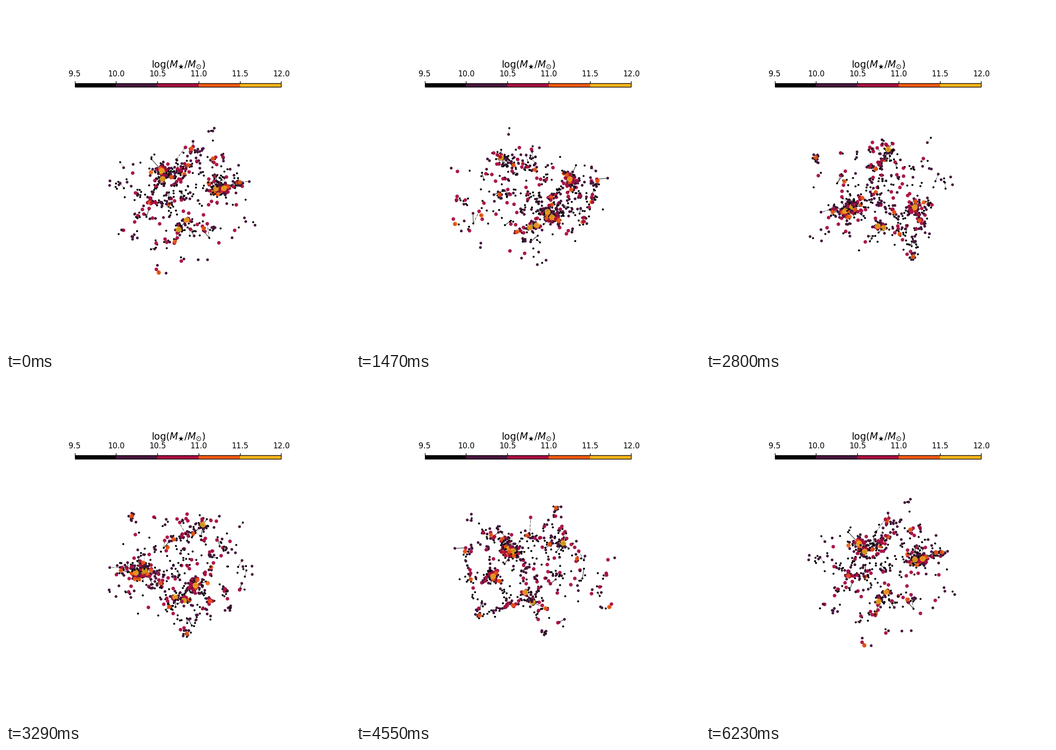
A matplotlib script that plays this animation: 748x748 px, repeating every 6.3 s.

```python
import numpy as np
import matplotlib.pyplot as plt
from matplotlib.animation import FuncAnimation
from matplotlib.collections import LineCollection
from matplotlib.colors import BoundaryNorm, ListedColormap, to_rgba

SIZE, FRAMES, STEP = 748, 90, 70
CENTER = np.array([381.0, 414.0])
DIST = 2570.0                       # camera distance in pixels
ELEV = np.radians(30)
BOX = np.array([140, 140, 100])     # half sizes of the survey volume
BOX_TURN = -30                      # the volume's own angle at the start

COLORS = ["#000000", "#47163d", "#a80d40", "#f0590f", "#f8b51a"]
DIAMETER = np.array([4.4, 6.0, 7.8, 9.4, 12.6])
ALPHA = [1, 1, 0.95, 0.88, 0.8]
ORANGE, YELLOW = 3, 4

# Key points are (right, front, up) in pixels around the volume's centre.
HALOS = [((-43, -90, 14), 10, 55), ((-39, 62, 78), 8, 20),
         ((12, -11, -67), 6, 10), ((-6, 2, -83), 7, 12),
         ((94, -34, 1), 9, 42), ((76, -27, 4), 12, 50)]

BIG = [(23, -141, 43), (70, -77, 52), (15, -6, 74), (-21, 36, 68),
       (7, -132, -18), (122, 78, 79), (125, -44, 10), (-70, -52, -46),
       (-29, -119, -90), (-14, 30, -97), (47, 112, -13), (-47, 166, -88)]

rng = np.random.default_rng(12)
points, kinds, links = [], [], []


def turn(p, deg):
    """Rotate points about the vertical axis."""
    c, s = np.cos(np.radians(deg)), np.sin(np.radians(deg))
    x, f, z = np.asarray(p, float).T
    return np.column_stack([x * c - f * s, x * s + f * c, z])


def add(p, kind):
    points.extend(p)
    kinds.extend(np.broadcast_to(kind, len(p)))


def add_small(p):
    add(p, rng.choice(3, len(p), p=(0.5, 0.32, 0.18)))


def scatter_around(center, spread, n):
    return np.asarray(center) + rng.normal(0, spread, (n, 3))


def add_halo(center, spread, n):
    p = scatter_around(center, spread, n)
    add_small(p)
    links.extend((center, q) for q in p if rng.random() < 0.75)
    if n > 40:
        add(scatter_around(center, spread, 3), ORANGE)


def add_group(center, spread, n):
    p = scatter_around(center, spread, n)
    add_small(p)
    links.extend((a, b) for a, b in zip(p, p[1:]) if rng.random() < 0.2)


def add_filaments(nodes, reach=105):
    """String small galaxies from each node to its nearest neighbours."""
    for a in nodes:
        gaps = np.linalg.norm(nodes - a, axis=1)
        for k in np.argsort(gaps)[1:3]:
            if gaps[k] < reach:
                n = int(gaps[k] / 11) + 1
                along = rng.random((n, 1))
                jitter = rng.normal(0, 5, (n, 3))
                add_small(a + along * (nodes[k] - a) + jitter)
                if gaps[k] < 45:
                    links.append((a, nodes[k]))


def build():
    centers = np.array([h[0] for h in HALOS], float)
    big = np.array(BIG, float)
    nodes = np.vstack([centers, big])
    add(centers, YELLOW)
    add(big, ORANGE)
    add_small(nodes + rng.normal(0, 1, nodes.shape))
    for halo in HALOS:
        add_halo(*halo)
    for center in big:
        add_group(center, rng.uniform(3, 13), rng.integers(2, 11))
    add_filaments(nodes)

    for center in turn(rng.uniform(-1, 1, (42, 3)) * BOX, BOX_TURN):
        add_group(center, rng.uniform(3, 9), rng.integers(1, 8))
    add_small(turn(rng.triangular(-1, 0, 1, (95, 3)) * BOX, BOX_TURN))


def project(p, deg):
    """Screen positions and nearness after turning by deg."""
    x, front, up = turn(p, deg).T
    near = front * np.cos(ELEV) + up * np.sin(ELEV)
    down = front * np.sin(ELEV) - up * np.cos(ELEV)
    scale = DIST / (DIST - near)
    return CENTER + np.column_stack([x, down]) * scale[:, None], near


build()
points, kinds = np.array(points), np.array(kinds)
ends = np.array(links, float).reshape(-1, 3)
rgba = np.array([to_rgba(c, a) for c, a in zip(COLORS, ALPHA)])
areas = (DIAMETER * 0.72) ** 2

fig = plt.figure(figsize=(SIZE / 100, SIZE / 100), dpi=100, facecolor="white")
ax = fig.add_axes([0, 0, 1, 1])
ax.set(xlim=(0, SIZE), ylim=(SIZE, 0))
ax.axis("off")

lines = LineCollection([], colors="black", zorder=1,
                       linewidths=[0.7, 0.5, 0.7, 0.6],
                       linestyles=["-", ":", "-", "-."])
ax.add_collection(lines)
dots = ax.scatter(points[:, 0], points[:, 1], linewidths=0, zorder=2)

# mass scale
bounds = np.arange(9.5, 12.1, 0.5)
cax = fig.add_axes([149.5 / SIZE, 1 - 175.7 / SIZE, 449 / SIZE, 8 / SIZE])
scale_map = plt.cm.ScalarMappable(BoundaryNorm(bounds, len(COLORS)),
                                  ListedColormap(COLORS))
bar = fig.colorbar(scale_map, cax=cax, orientation="horizontal", ticks=bounds)
bar.outline.set_linewidth(1)
cax.xaxis.set_ticks_position("top")
cax.tick_params(labelsize=12, length=3.5, width=1, pad=4.5)
cax.set_xticks(bounds, [f"{b:.1f}" for b in bounds])
fig.text(375 / SIZE, 1 - 133.5 / SIZE, r"log($M_{\bigstar}/M_{\odot}$)",
         fontsize=15, ha="center", va="baseline")


def draw(i):
    deg = i * 360 / FRAMES
    xy, near = project(points, deg)
    order = np.argsort(near + 12 * kinds)   # heavy ones veil their satellites
    dots.set_offsets(xy[order])
    dots.set_sizes(areas[kinds[order]])
    dots.set_facecolors(rgba[kinds[order]])
    lines.set_segments(project(ends, deg)[0].reshape(-1, 2, 2))
    return lines, dots


anim = FuncAnimation(fig, draw, frames=FRAMES, interval=STEP, repeat=True,
                     repeat_delay=0, blit=False)
plt.show()
```
